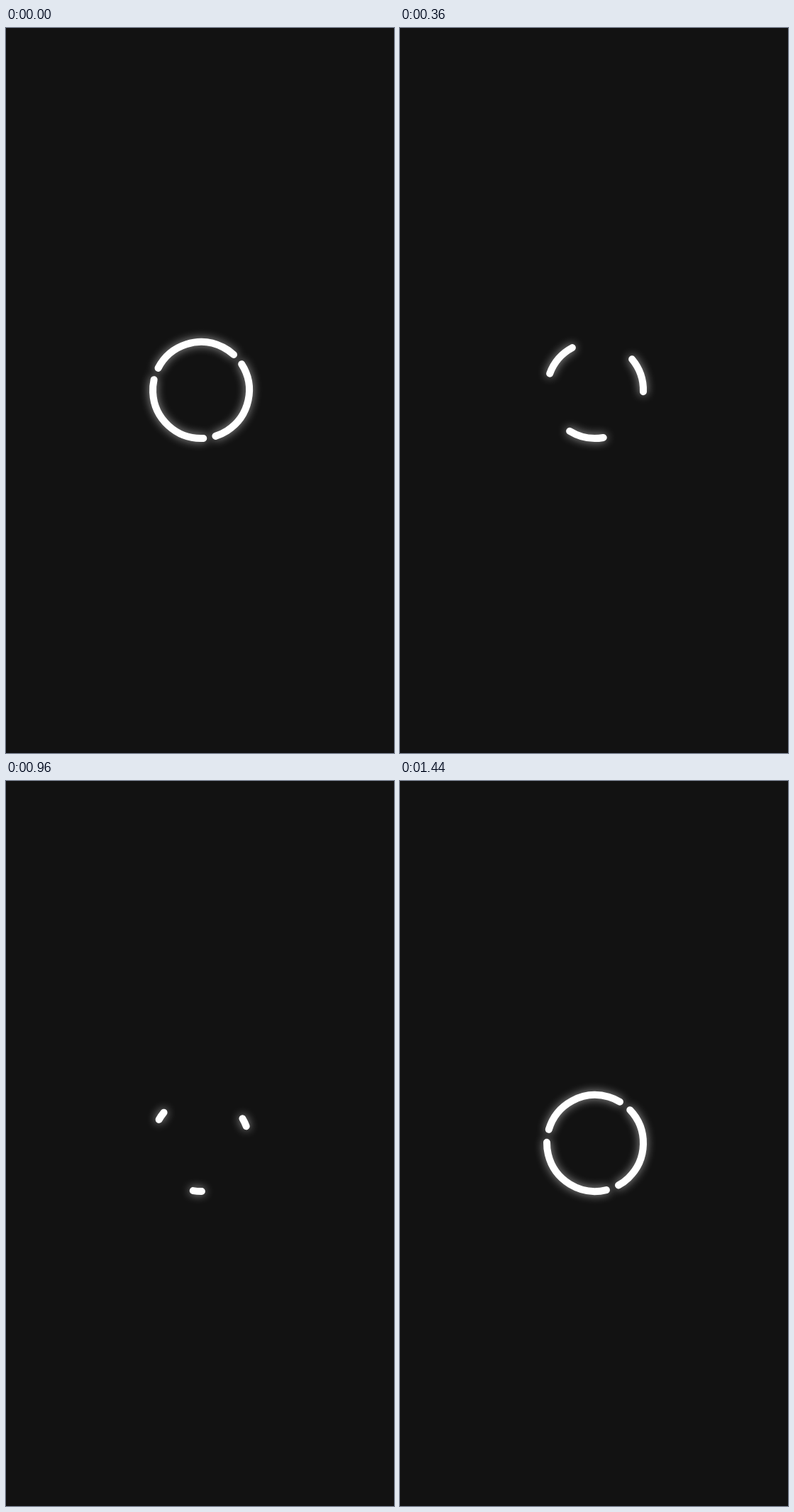
Write an HTML page with a canvas that moves like this. It is 547x1023 px and loops after 1.48 s.

```html
<!DOCTYPE html>
<html lang="en">
<head>
<meta charset="utf-8">
<title>Loader</title>
<style>
  html, body { margin: 0; width: 100%; height: 100%; overflow: hidden; background: #121212; }
  canvas { display: block; }
</style>
</head>
<body>
<canvas id="stage" width="547" height="1023"></canvas>
<script>
const ctx = document.getElementById('stage').getContext('2d');
const LOOP = 1480, STEP = 40;
const CX = 275, CY = 511, RADIUS = 68;

// Two turns per loop; the arcs shrink to dots while spinning fastest.
const times  = [0, 280, 480, 760, 960, 1160, 1440];
const angles = [19.9, 73.3, 163.3, 430.8, 574.4, 683.2, 728.7];
const spans  = [105.3, 69.1, 5.9, 4.5, 10.3, 85.3, 104.5];

// Monotone cubic interpolation through the keys.
function curve(xs, ys) {
  const slope = xs.slice(1).map((x, i) => (ys[i + 1] - ys[i]) / (x - xs[i]));
  const last = slope.length;
  const tangent = xs.map((_, i) => {
    if (i === 0) return slope[0] / 2;
    if (i === last) return slope[last - 1] / 2;
    const a = slope[i - 1], b = slope[i];
    return a * b > 0 ? 2 * a * b / (a + b) : 0;
  });
  return x => {
    let i = 0;
    while (i < last - 1 && x > xs[i + 1]) i++;
    const h = xs[i + 1] - xs[i], u = (x - xs[i]) / h, v = 1 - u;
    return v * v * (1 + 2 * u) * ys[i] + u * u * (1 + 2 * v) * ys[i + 1]
      + h * u * v * (v * tangent[i] - u * tangent[i + 1]);
  };
}

const angleAt = curve(times, angles);
const spanAt = curve(times, spans);
const rad = deg => deg * Math.PI / 180;

function strokeArcs(mid, span) {
  ctx.beginPath();
  for (let k = 0; k < 3; k++) {
    const from = rad(mid + k * 120 - span / 2);
    ctx.moveTo(CX + RADIUS * Math.cos(from), CY + RADIUS * Math.sin(from));
    ctx.arc(CX, CY, RADIUS, from, from + rad(span));
  }
  ctx.stroke();
}

function draw(t) {
  ctx.shadowColor = 'transparent';
  ctx.fillStyle = '#121212';
  ctx.fillRect(0, 0, 547, 1023);
  ctx.strokeStyle = '#fff';
  ctx.lineWidth = 10;
  ctx.lineCap = 'round';
  ctx.shadowColor = 'rgba(255, 255, 255, 0.6)';
  ctx.shadowBlur = 13;
  strokeArcs(angleAt(t), spanAt(t));
}

const begin = performance.now();
function tick() {
  const t = (performance.now() - begin) % LOOP;
  draw(Math.floor(t / STEP) * STEP);
  requestAnimationFrame(tick);
}
tick();
</script>
</body>
</html>
```
